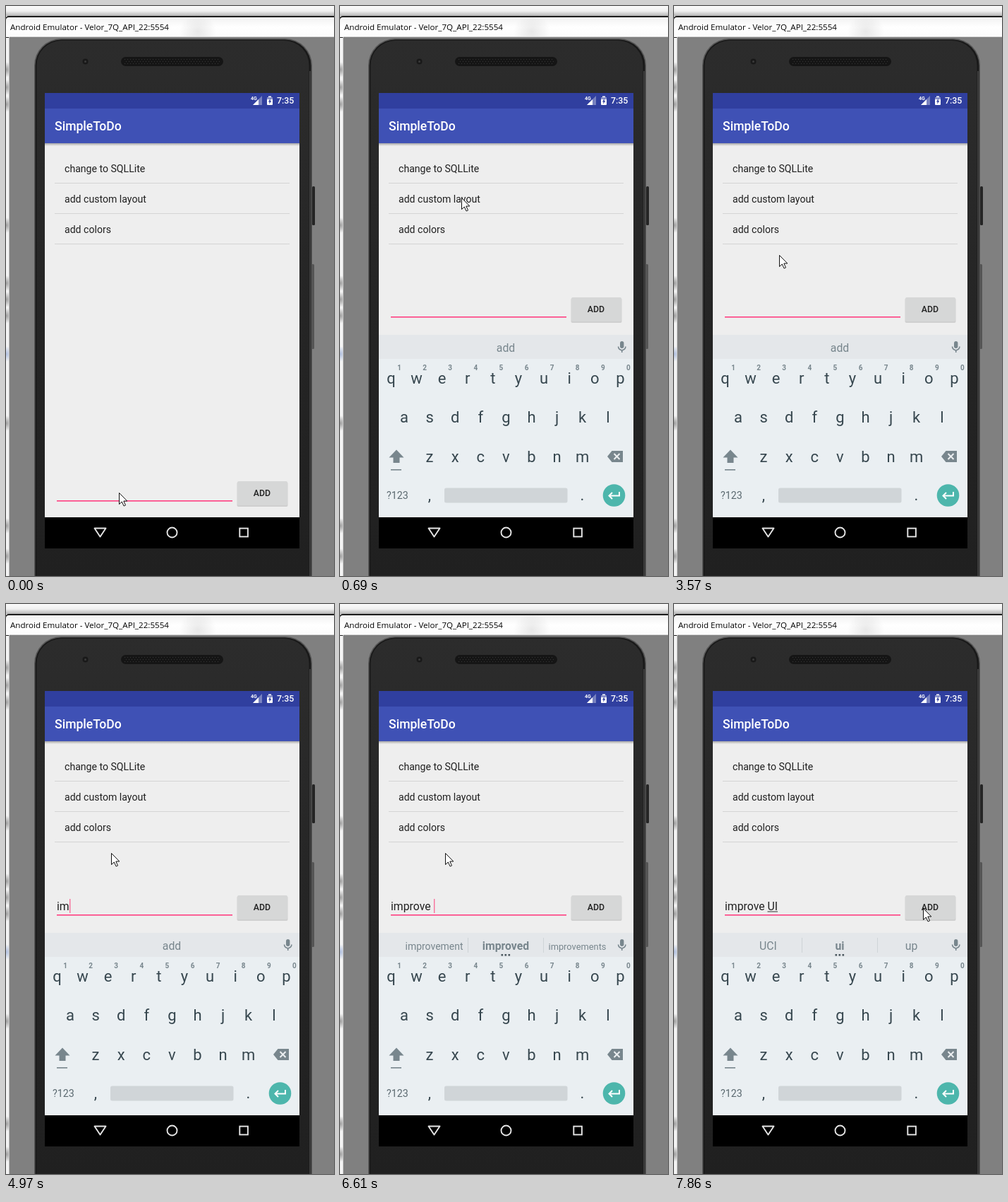
Write an HTML page with a canvas that moves like this. It is 465 px wide and 806 px high and loops after 8 s.

```html
<!DOCTYPE html>
<html lang="en">
<head>
<meta charset="utf-8">
<title>To-do app in an emulator</title>
<style>
html, body { margin: 0; width: 100%; height: 100%; overflow: hidden; background: #808080; }
canvas { display: block; width: 465px; height: 806px; }
</style>
</head>
<body>
<canvas id="stage" width="465" height="806"></canvas>
<script>
const ctx = document.getElementById('stage').getContext('2d');
const LOOP = 8000;
const ROBOTO = 'Roboto, sans-serif';
const INK = '#37474f', MUTED = '#78868d', PINK = '#ff4081';

// Each entry changes only the listed state from its start time on.
const timeline = [
  [0, { x: 160, y: 688, keyboard: 0, caret: false, text: '', word: -1, hints: ['', 'add', ''] }],
  [150, { y: 713, keyboard: 0.5 }],
  [270, { x: 150, y: 660, keyboard: 1, caret: true }],
  [420, { x: 163, y: 440 }],
  [540, { x: 176, y: 258 }],
  [690, { x: 172, y: 271, caret: false }],
  [840, { x: 169, y: 290 }],
  [960, { x: 160, y: 318 }],
  [1080, { x: 151, y: 338 }],
  [1200, { x: 147, y: 345, caret: true }],
  [1350, { x: 149, y: 352 }],
  [1630, { caret: false }],
  [2050, { caret: true }],
  [2580, { caret: false }],
  [3140, { caret: true }],
  [3570, { caret: false }],
  [4170, { caret: true }],
  [4570, { caret: false }],
  [4850, { caret: true, text: 'i' }],
  [4970, { text: 'im' }],
  [5120, { text: 'imp', word: 0 }],
  [5240, { hints: ['import', 'imp', 'important'], more: true }],
  [5680, { text: 'impr' }],
  [5800, { hints: ['improving', 'impr', 'impressive'] }],
  [5940, { text: 'impro' }],
  [6070, { text: 'improv' }],
  [6190, { text: 'improve', hints: ['improved', 'improve', 'improvements'] }],
  [6340, { caret: false }],
  [6470, { caret: true }],
  [6610, { text: 'improve ', word: -1, hints: ['improvement', 'improved', 'improvements'] }],
  [6740, { hints: ['your', 'the', 'my'], more: false }],
  [7050, { text: 'improve U', word: 8 }],
  [7190, { text: 'improve UI' }],
  [7310, { hints: ['UCI', 'ui', 'up'], more: true }],
  [7740, { x: 262, y: 394, caret: false }],
  [7860, { x: 353, y: 430 }]
];

function stateAt(time) {
  const state = {};
  for (const [start, change] of timeline) if (time >= start) Object.assign(state, change);
  return state;
}

function rect(x, y, w, h, color) {
  ctx.fillStyle = color;
  ctx.fillRect(x, y, w, h);
}

function round(x, y, w, h, r, color) {
  ctx.beginPath();
  ctx.roundRect(x, y, w, h, r);
  ctx.fillStyle = color;
  ctx.fill();
}

function disc(x, y, r, color) {
  ctx.beginPath();
  ctx.arc(x, y, r, 0, Math.PI * 2);
  ctx.fillStyle = color;
  ctx.fill();
}

function poly(points, fill, stroke, width = 1) {
  ctx.beginPath();
  points.forEach(([x, y]) => ctx.lineTo(x, y));
  ctx.closePath();
  if (fill) { ctx.fillStyle = fill; ctx.fill(); }
  if (stroke) { ctx.strokeStyle = stroke; ctx.lineWidth = width; ctx.stroke(); }
}

function line(points, color, width) {
  ctx.beginPath();
  points.forEach(([x, y]) => ctx.lineTo(x, y));
  ctx.strokeStyle = color;
  ctx.lineWidth = width;
  ctx.stroke();
}

function label(text, x, y, size, color, { weight = 400, align = 'left', family = ROBOTO } = {}) {
  ctx.font = `${weight} ${size}px ${family}`;
  ctx.textAlign = align;
  ctx.fillStyle = color;
  ctx.fillText(text, x, y);
}

function vertical(y0, y1, ...colors) {
  const g = ctx.createLinearGradient(0, y0, 0, y1);
  colors.forEach((c, i) => g.addColorStop(i / (colors.length - 1), c));
  return g;
}

function smudge(x, y, r, rgb, alpha) {
  const g = ctx.createRadialGradient(x, y, 0, x, y, r);
  g.addColorStop(0, `rgba(${rgb},${alpha})`);
  g.addColorStop(1, `rgba(${rgb},0)`);
  rect(x - r, y - r, r * 2, r * 2, g);
}

function drawWindow() {
  rect(0, 0, 465, 806, '#f4f4f4');
  rect(0, 0, 465, 14, vertical(0, 14, '#fafafa', '#f0f0f0', '#b4b4b4'));
  for (const y of [90, 115, 139, 310, 392, 415, 438, 590, 735, 778]) smudge(0, y, 11, '70,70,70', 0.5);
  smudge(0, 492, 11, '70,110,190', 0.4);
  round(-1, 14, 480, 31, [5, 0, 0, 0], '#1d1d1d');
  round(0, 16, 480, 28, [4, 0, 0, 0], vertical(16, 44, '#f2f2f2', '#ffffff', '#fbfbfb'));
  smudge(272, 36, 26, '120,120,120', 0.16);
  rect(4, 44, 1, 762, '#b8b8b8');
  rect(5, 44, 460, 762, '#808080');
  rect(5, 43, 460, 1, '#d8d8d8');
  label('Android Emulator - Velor_7Q_API_22:5554', 6, 34, 11.6, '#000',
    { family: '"Open Sans", sans-serif' });
}

function drawPhone() {
  round(434, 255, 4, 55, 1.5, '#252525');
  round(433, 365, 4, 120, 1.5, '#555');
  round(40, 46, 394, 820, [38, 38, 0, 0], '#565656');
  round(41.5, 47.5, 391, 820, [37, 37, 0, 0], '#191919');
  round(43.5, 49, 386, 820, [35, 35, 0, 0], vertical(49, 806, '#2c2c2c', '#252525', '#202020'));
  rect(430, 92, 2, 714, '#3b3b3b');
  disc(112.5, 78.5, 4, '#191919');
  disc(112.5, 78.5, 1.5, '#3b3b3b');
  round(163, 72, 145, 13, 6.5, '#151515');
  for (let row = 0; row < 3; row++)
    for (let x = 168 + row % 2 * 2; x < 304; x += 4) rect(x, 75 + row * 3, 1, 1, '#373737');
}

function drawStatusBar() {
  rect(55, 123, 361, 22, '#303f9f');
  label('4G', 347, 133, 7, '#fff', { weight: 700 });
  poly([[350, 140], [363, 140], [363, 127]], 'rgba(255,255,255,.35)');
  poly([[350, 140], [358, 140], [358, 132]], '#fff');
  round(370, 129, 8, 11, 1, '#fff');
  rect(372, 127.5, 4, 2, '#fff');
  rect(370, 129, 8, 3, 'rgba(48,63,159,.55)');
  poly([[374.8, 130.5], [372, 135.4], [373.6, 135.4], [373.2, 138.7], [376.2, 133.9], [374.5, 133.9]], '#303f9f');
  label('7:35', 384, 138, 12.4, '#fff', { weight: 500 });
}

function drawApp() {
  rect(55, 123, 361, 600, '#eeeeee');
  drawStatusBar();
  rect(55, 145, 361, 49, '#3f51b5');
  rect(55, 194, 361, 4, vertical(194, 198, 'rgba(0,0,0,.3)', 'rgba(0,0,0,0)'));
  label('SimpleToDo', 69, 176, 17.6, '#fff', { weight: 500 });
  ['change to SQLLite', 'add custom layout', 'add colors'].forEach((item, i) => {
    label(item, 83, 234.5 + i * 43, 14.1, '#212121');
    rect(69, 250 + i * 43, 333, 1, '#d4d4d4');
  });
}

function drawEntry(state) {
  const top = state.keyboard === 1 ? 412 : 672;
  round(327.5, top + 1, 72, 35, 2, 'rgba(0,0,0,.13)');
  round(328, top, 71, 34, 2, '#d6d7d7');
  label('ADD', 363, top + 21, 12.3, '#212121', { weight: 500, align: 'center' });
  rect(72, top + 27, 249, 1.6, PINK);
  label(state.text, 72, top + 21, 15.8, '#212121');
  const widthOf = s => ctx.measureText(s).width;
  const end = 72 + widthOf(state.text);
  if (state.word >= 0) {
    const start = 72 + widthOf(state.text.slice(0, state.word));
    rect(start, top + 22.5, end - start, 1, '#333');
  }
  if (state.caret) rect(Math.round(end), top + 5, 1.4, 20, '#f8709c');
}

function drawHints(state) {
  rect(55, 465, 361, 34, '#e4e7ea');
  const choices = state.hints[0] !== '';
  state.hints.forEach((hint, i) => {
    const weight = choices && i === 1 ? 700 : 400;
    ctx.font = `${weight} 15.8px ${ROBOTO}`;
    const size = 15.8 * Math.min(1, 82 / Math.max(1, ctx.measureText(hint).width));
    label(hint, [133.5, 235, 336.5][i], 488.5, size, MUTED, { weight, align: 'center' });
  });
  if (choices) for (const x of [181, 288]) rect(x, 472, 1, 21, '#cfd4d7');
  if (state.more) for (const x of [228.5, 233.5, 238.5]) rect(x, 495, 2.6, 2.6, '#4d5a61');

  round(397, 474, 5.4, 10, 2.7, MUTED);
  ctx.beginPath();
  ctx.arc(399.7, 481.5, 5.2, 0, Math.PI);
  ctx.strokeStyle = MUTED;
  ctx.lineWidth = 1.6;
  ctx.stroke();
  rect(398.9, 486, 1.6, 4, MUTED);
}

function drawKeys() {
  const rows = [['qwertyuiop', 72.5, 533.5], ['asdfghjkl', 91, 589], ['zxcvbnm', 127, 644.5]];
  for (const [keys, x, y] of rows)
    [...keys].forEach((key, i) => label(key, x + i * 36.1, y, 22, INK, { align: 'center' }));
  [...'1234567890'].forEach((digit, i) =>
    label(digit, 84 + i * 36.1, 515, 10, MUTED, { weight: 700, align: 'center' }));

  poly([[80, 627.5], [90.5, 638.5], [84.5, 638.5], [84.5, 646], [75.5, 646], [75.5, 638.5], [69.5, 638.5]], MUTED);
  rect(72, 655, 15, 1.6, MUTED);
  poly([[379, 637], [385.5, 629], [401, 629], [401, 645], [385.5, 645]], MUTED);
  line([[388.5, 633], [396.5, 641]], '#eceff1', 2);
  line([[396.5, 633], [388.5, 641]], '#eceff1', 2);

  label('?123', 66, 697, 14.3, '#5b6970');
  label(',', 127, 699, 22, INK, { align: 'center' });
  label('.', 343.5, 699, 22, INK, { align: 'center' });
  round(148, 681.5, 174.5, 21, 2.5, '#d0d5d8');
  disc(388.5, 692, 15.8, '#4db6ac');
  line([[396, 687], [396, 692.5], [382, 692.5]], '#fff', 2);
  line([[386, 688], [381.5, 692.5], [386, 697]], '#fff', 2);
}

function drawKeyboard(state) {
  if (!state.keyboard) return;
  ctx.save();
  ctx.beginPath();
  ctx.rect(55, 123, 361, 600);
  ctx.clip();
  ctx.globalAlpha = state.keyboard;
  ctx.translate(0, (1 - state.keyboard) * 80);
  rect(55, 465, 361, 258, '#eaeff2');
  drawHints(state);
  drawKeys();
  ctx.restore();
}

function drawNavigation() {
  rect(55, 723, 361, 44, '#000');
  ctx.lineJoin = 'round';
  poly([[125.5, 738.5], [141.5, 738.5], [133.5, 750.5]], null, '#e6e6e6', 1.9);
  ctx.lineJoin = 'miter';
  ctx.beginPath();
  ctx.arc(235.5, 744.5, 7, 0, Math.PI * 2);
  ctx.stroke();
  ctx.strokeRect(331.3, 738.6, 11.6, 11.8);
}

function drawPointer(x, y) {
  const arrow = [[0, 0], [0, 16], [3.8, 12.5], [6.6, 18.5], [9, 17.4], [6.3, 11.5], [11.3, 11.5]];
  poly(arrow.map(([dx, dy]) => [x + 0.5 + dx, y + 0.5 + dy]), '#fff', '#111', 1);
}

function draw(time) {
  const state = stateAt(time);
  drawWindow();
  drawPhone();
  drawApp();
  drawEntry(state);
  drawKeyboard(state);
  drawNavigation();
  drawPointer(state.x, state.y);
}

let origin;
function tick(now) {
  origin ??= now;
  draw((now - origin) % LOOP);
  requestAnimationFrame(tick);
}
draw(0);
requestAnimationFrame(tick);
</script>
</body>
</html>
```
